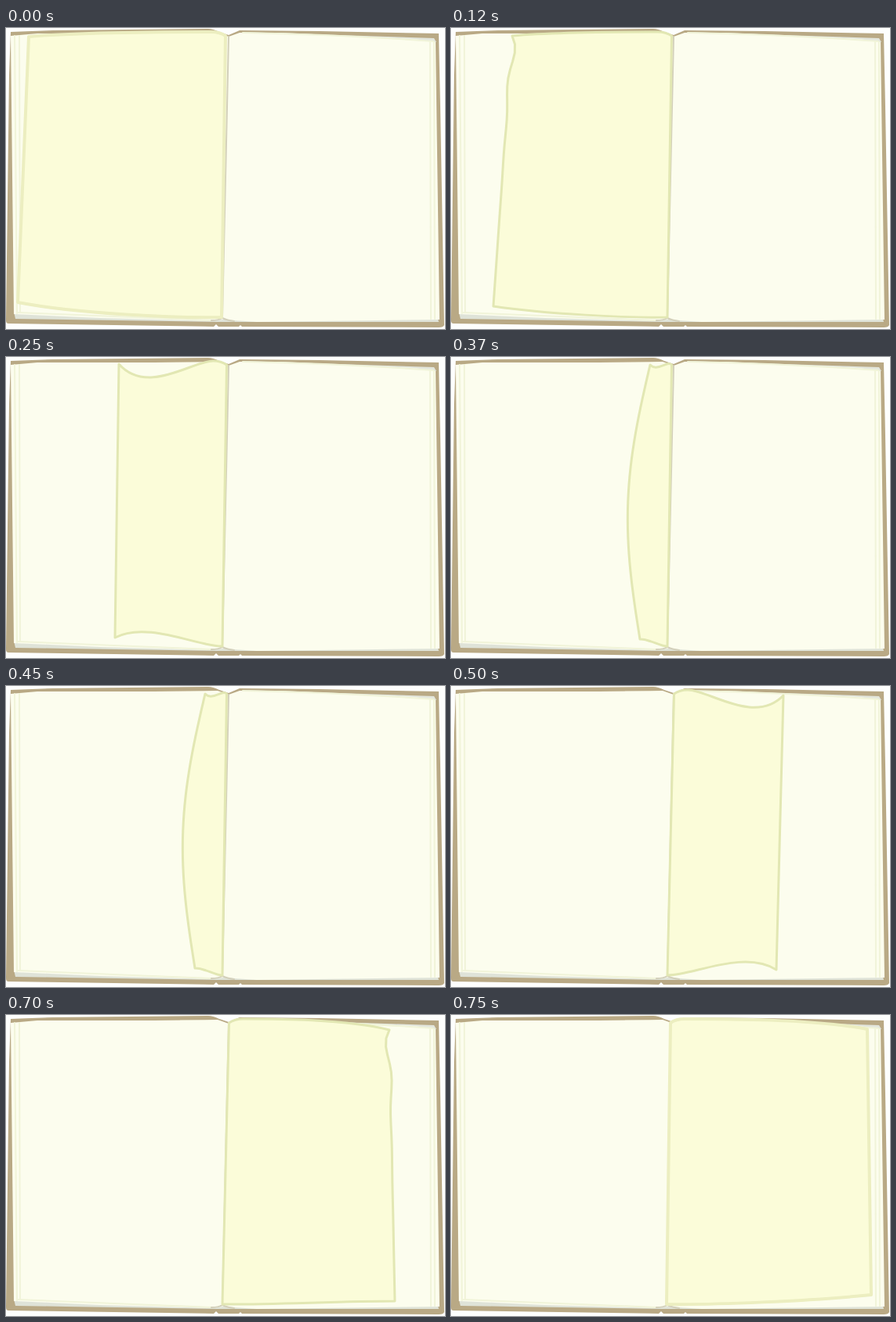
Recreate the animation shown at these times as an HTML page. Size 560 by 384 pixels, loop 0.87 s.

```html
<!DOCTYPE html>
<html lang="en">
<head>
<meta charset="utf-8">
<title>Turning page</title>
<style>
html, body { margin: 0; width: 100%; height: 100%; overflow: hidden; background: #fdfefd; }
svg { display: block; fill: none; stroke-linejoin: round; stroke-linecap: round; }
</style>
</head>
<body>
<svg width="560" height="384" viewBox="0 0 560 384">
  <!-- cover, with a notch at each end of the spine -->
  <path fill="#b9a985" d="M6 5L60 3 258 1Q264 1 272 5L284 9 298 3 400 4 552 7 554 100 559 379Q558 382 552 382L301 381 299 379 297 381 271 381 268 378 265 381 3 377Q0 377 0 373L4 60Z"/>
  <!-- shadows under the paper -->
  <path fill="#dfe3d8" d="M10 362L12 371 270 375 552 375 551 371 270 368Z"/>
  <path fill="#e3e6dc" d="M300 5L546 13 549 18 400 14Z"/>
  <!-- paper and its edges -->
  <path fill="#fcfdee" d="M6 10L40 7 190 7 270 6 284 11 298 6 350 6 520 14 548 18 553 372 320 375 277 372 262 374 120 370 10 365Z"/>
  <path stroke="#f1f4d9" stroke-width="2" d="M11 10L14 364M17 10L18 363M541 18L542 371M546 18L547 371M16 363L262 373M302 6Q420 8 545 17"/>
  <path stroke="#d3d0bb" stroke-width="2" d="M284 11L276 370M262 373Q271 373 276 370Q282 373 291 374"/>
  <path id="page" fill="#fbfcd9"/>
</svg>
<script>
const LOOP = 870, SPINE = 283, FULL_WIDTH = 240, CURL_WIDTH = 150;

// Free corners of the page in each pose: top x, y and bottom x, y
const poses = [
  [29, 11, 15, 350],
  [78, 10, 54, 355],
  [144, 9, 139, 358],
  [254, 10, 241, 360],
  [424, 12, 415, 362],
  [489, 19, 496, 365],
  [531, 18, 536, 357]
];
const poseEnd = i => Math.floor(12.5 * (i + 1)) * 10;
const mix = (a, b, t) => a + (b - a) * t;
const page = document.getElementById("page");

// The narrower the page stands, the more its ends sag and its free edge bows.
function pageOutline([topX, topY, bottomX, bottomY]) {
  const side = Math.sign(topX - SPINE);
  const width = Math.abs(topX - SPINE);
  const flat = width > FULL_WIDTH;
  const sag = width < CURL_WIDTH ? width * 0.32 : 0;
  const bow = Math.max(0, 28 * (1 - width / 130));
  const curl = flat || sag ? 0 : 8;

  const hingeX = flat ? 280 : SPINE + side * 1.5;
  const footX = flat ? 275 : 276;
  const crestX = hingeX + side * Math.min(18, width / 8);
  const crestY = 10 - 5 * Math.min(1, width / 100);

  let edge = "";
  for (let v = 0; v <= 1; v += 1 / 32) {
    const out = bow * Math.sin(Math.PI * v) - curl * Math.sin(24 * v) * Math.exp(-8 * v);
    edge += `L${mix(topX, bottomX, v) + side * out} ${mix(topY, bottomY, v)}`;
  }
  return `M${footX} 369L${hingeX} 10Q${mix(hingeX, crestX, 0.4)} ${crestY} ${crestX} ${crestY}`
    + `C${mix(topX, crestX, 0.78)} ${crestY} ${mix(topX, crestX, 0.3)} ${crestY + sag} ${topX} ${topY}`
    + edge
    + `C${mix(bottomX, footX, 0.3)} ${365 - sag * 0.65} ${mix(bottomX, footX, 0.78)} 370 ${footX} 369Z`;
}

function draw() {
  const time = performance.now() % LOOP;
  const pose = poses.find((_, i) => time < poseEnd(i));
  const flat = Math.abs(pose[0] - SPINE) > FULL_WIDTH;
  page.setAttribute("d", pageOutline(pose));
  page.setAttribute("stroke", flat ? "#eceec0" : "#e2e7b3");
  page.setAttribute("stroke-width", flat ? 4 : 3);
  requestAnimationFrame(draw);
}
draw();
</script>
</body>
</html>
```
